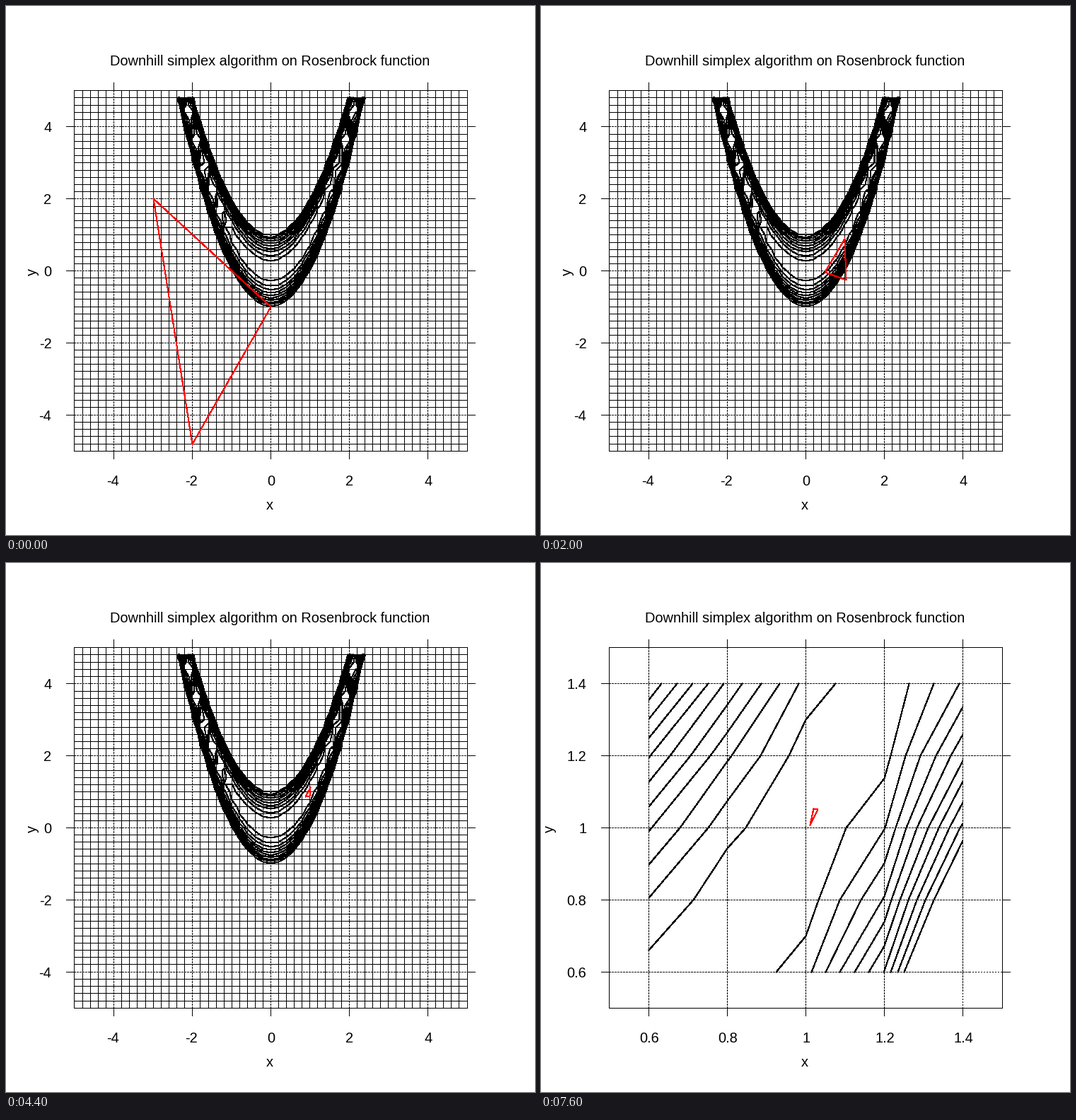
A matplotlib script for the animation above (8 s loop, 748 by 748 pixels).

```python
from itertools import product

import numpy as np
import matplotlib.pyplot as plt
from matplotlib.animation import FuncAnimation
from matplotlib.collections import LineCollection
from matplotlib.transforms import Bbox

SIZE, DPI = 748, 64
PX = 72 / DPI                      # one pixel in points
LEFT, RIGHT, TOP, BOTTOM, MID = 96, 652, 119, 629, 374
TICK = 11
LEVELS = range(10, 101, 10)
CONTRACT = 0.57
ZOOM_FRAME, FRAMES = 16, 20

plt.rcParams["font.family"] = "Liberation Sans"
fig = plt.figure(figsize=(SIZE / DPI, SIZE / DPI), dpi=DPI, facecolor="white")
ax = fig.add_axes([0, 0, 1, 1])
ax.set_xlim(0, SIZE)
ax.set_ylim(SIZE, 0)
ax.axis("off")


def rosenbrock(p):
    x, y = p
    return (1 - x) ** 2 + 100 * (y - x * x) ** 2


def nelder_mead_step(simplex):
    """Reflect the worst corner, else contract, else shrink to the best."""
    best, middle, worst = sorted(simplex, key=rosenbrock)
    center = (best + middle) / 2
    for factor in (1, CONTRACT):
        trial = center + factor * (center - worst)
        if rosenbrock(trial) < rosenbrock(worst):
            return [best, middle, trial]
    return [best, (best + middle) / 2, (best + worst) / 2]


def simplex_history():
    simplex = [np.array(p) for p in ((-3.0, 2.0), (-2.0, -4.8), (0.0, -1.0))]
    history = [simplex]
    for frame in range(1, FRAMES):
        if frame != ZOOM_FRAME:    # the zoom shows the same simplex again
            simplex = nelder_mead_step(simplex)
        history.append(simplex)
    return history


def contour_segments(first, last):
    """Linear contours on a mesh of step 0.2, cells split along a diagonal."""
    segments = []
    for i, j in product(range(first, last), repeat=2):
        corners = np.array([(i, j), (i + 1, j), (i + 1, j + 1), (i, j + 1)]) / 5
        values = [rosenbrock(c) for c in corners]
        for level in LEVELS:
            if not min(values) < level <= max(values):
                continue
            hits = []
            for a in range(4):
                b = (a + 1) % 4
                if (values[a] < level) != (values[b] < level):
                    t = (level - values[a]) / (values[b] - values[a])
                    hits.append(corners[a] + t * (corners[b] - corners[a]))
            segments += zip(hits[::2], hits[1::2])
    return segments


class View:
    def __init__(self, center, scale, ticks, mesh, ylabel_x, minor):
        self.center, self.scale = center, scale
        self.artists = []
        cols = [self.to_pixel((t, t)) for t in ticks]
        if minor:
            fine = [self.to_pixel((k / 5, k / 5))
                    for k in range(-24, 25) if k % 10]
            self.lines(self.cross(fine))
        self.lines(self.cross(cols), linestyle=(0, (2, 1)))
        segments = [self.to_pixel(s) for s in contour_segments(*mesh)]
        self.lines(segments, width=1.06, capstyle="round")
        for t, (x, y) in zip(ticks, cols):
            label = f"{t:g}"
            self.text(x + (-1 if t < 0 else 0.5), 678, label)
            self.text(64.5, y + 7.2, label, ha="right")
        self.text(ylabel_x, 376, "y", rotation=90, rotation_mode="anchor")

    def to_pixel(self, points):
        offset = (np.asarray(points) - self.center) * self.scale
        return MID + 0.5 + np.trunc(offset * (55.62, -51.05))

    @staticmethod
    def cross(positions):
        vertical = [[(x, TOP), (x, BOTTOM + 1)] for x, _ in positions]
        horizontal = [[(LEFT, y), (RIGHT + 1, y)] for _, y in positions]
        return vertical + horizontal

    def lines(self, segments, **style):
        self.artists.append(add_lines(segments, **style))

    def text(self, *args, **style):
        self.artists.append(add_text(*args, **style))

    def show(self, visible):
        for artist in self.artists:
            artist.set_visible(visible)


def add_lines(segments, width=1.0, color="black", **style):
    lines = LineCollection(segments, colors=color, linewidths=width * PX,
                           antialiaseds=False, **style)
    lines.set_snap(False)
    ax.add_collection(lines, autolim=False)
    return lines


def add_text(x, y, string, ha="center", **style):
    return ax.text(x, y, string, fontsize=20 * PX, ha=ha, va="baseline", **style)


wide = View(0, 1, [-4, -2, 0, 2, 4], (-24, 24), 43, True)
zoom = View(1, 10, [0.6, 0.8, 1, 1.2, 1.4], (3, 7), 18, False)

# The far ends of some zoomed grid lines are only faintly dotted.
faint = [[(606, 578.5), (652, 578.5)], [(640, 476.5), (652, 476.5)],
         [(596.5, 604), (596.5, 629)]]
zoom.lines(faint, color="white")
zoom.lines(faint, linestyle=(0, (1, 2)))

# Border and outer ticks are the same in both views.
l, r, t, b = LEFT + 0.5, RIGHT + 0.5, TOP + 0.5, BOTTOM + 0.5
frame_lines = [[(l, t), (r, t)], [(r, t), (r, b)], [(r, b), (l, b)], [(l, b), (l, t)]]
for x, y in [wide.to_pixel((v, v)) for v in (-4, -2, 0, 2, 4)]:
    frame_lines += [[(x, t - TICK), (x, t)], [(x, b), (x, b + TICK)],
                    [(l - TICK, y), (l, y)], [(r, y), (r + TICK, y)]]
add_lines(frame_lines, capstyle="projecting")
add_text(373.5, 84, "Downhill simplex algorithm on Rosenbrock function")
add_text(372.5, 712.5, "x")

triangle, = ax.plot([], [], color="red", lw=1.06 * PX, antialiased=False,
                    snap=False, solid_capstyle="round")
triangle.set_clip_box(Bbox.from_extents(LEFT, SIZE - BOTTOM - 1,
                                        RIGHT + 1, SIZE - TOP - 1))
history = simplex_history()


def update(frame):
    zoomed = frame >= ZOOM_FRAME
    wide.show(not zoomed)
    zoom.show(zoomed)
    points = (zoom if zoomed else wide).to_pixel(history[frame])
    triangle.set_data(*np.vstack([points, points[:1]]).T)
    return [triangle]


animation = FuncAnimation(fig, update, frames=FRAMES, interval=400,
                          repeat=True, repeat_delay=0, blit=False)
plt.show()
```
